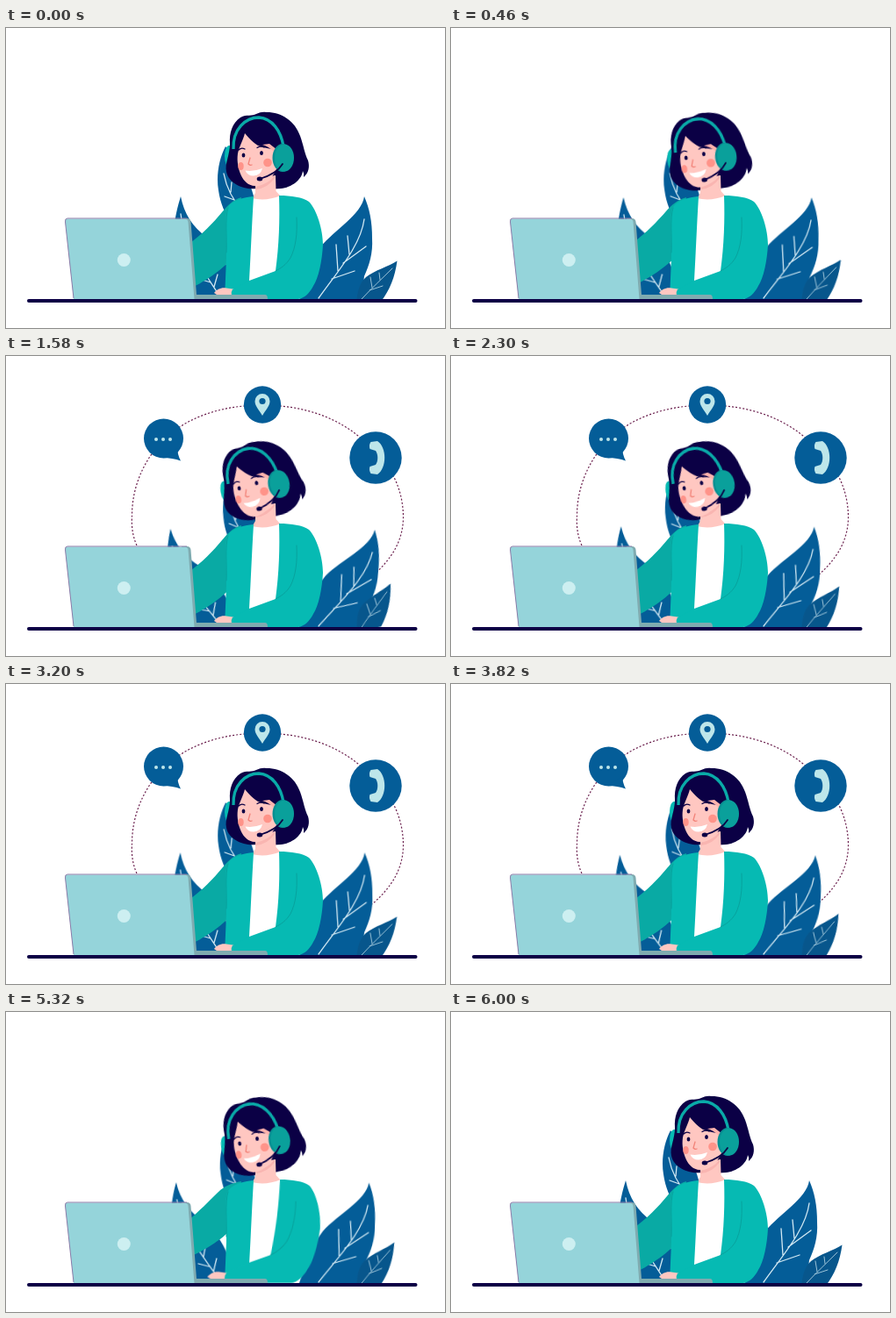
An HTML page for the animation above (6020 ms loop, 500 by 342 pixels).

```html
<!DOCTYPE html>
<html lang="en">
<head>
<meta charset="utf-8">
<title>Support agent at a laptop</title>
<style>
  html, body { margin: 0; width: 100%; height: 100%; overflow: hidden; background: #fff; }
  svg { display: block; width: 500px; height: 342px; }

  :root { --loop: 6020ms; }
  .blue { fill: #045d98; }
  .navy { fill: #0b0045; }
  .teal { fill: #06bab3; }
  .deep { fill: #09aaa4; }
  .skin { fill: #ffc7c1; }
  .pale { fill: #bde6ea; }
  .vein { fill: none; stroke: #d3e9f3; stroke-width: 1.3; stroke-linecap: round; }
  .fold { fill: none; stroke: #08a29d; stroke-width: 1; stroke-linecap: round; }

  /* Leaves: two full sways per loop */
  .leaf { animation: sway 1505ms cubic-bezier(.37, 0, .63, 1) infinite alternate; }
  @keyframes sway { from { transform: rotate(0); } to { transform: rotate(var(--turn)); } }
  .left { --turn: -6.1deg; transform-origin: 240px 305px; }
  .back { --turn: 2.8deg; transform-origin: 270px 300px; }
  .right { --turn: 6.1deg; transform-origin: 357px 308px; }
  .small { --turn: -9.5deg; transform-origin: 405px 308px; }

  .head { transform-origin: 301px 176px; animation: tilt var(--loop) ease-in-out infinite; }
  @keyframes tilt {
    0%, 51.5%, 72.3%, 100% { transform: rotate(0); }
    14.6%, 37.4%, 84.5% { transform: rotate(-10deg); }
  }

  .far-arm { animation: lift var(--loop) ease-in-out infinite; }
  @keyframes lift {
    0%, 5%, 23%, 72.5%, 100% { d: path("M268 193C258 196 252 203 246 210C236 222 224 235 207 247L207 298C224 291 246 276 258 262Z"); }
    13%, 16%, 86%, 90% { d: path("M268 193C257 195 248 199 242 205C232 215 220 227 205 240L207 280C222 274 246 260 258 246Z"); }
  }

  .near-arm { transform-origin: 340px 205px; animation: type var(--loop) ease-in-out infinite; }
  @keyframes type {
    0%, 76%, 98%, 100% { transform: skewX(0); }
    86%, 90% { transform: skewX(-4.5deg); }
  }

  .icon { animation: var(--loop) ease-out infinite; }
  .bubble { transform-origin: 180px 94px; animation-name: bubble; }
  .pin { transform-origin: 292px 55px; animation-name: pin; }
  .phone { transform-origin: 421px 116px; animation-name: phone; animation-timing-function: linear; }
  @keyframes bubble { 0%, 10.6%, 82.2%, 100% { transform: scale(0); } 13.1%, 79.4% { transform: scale(1); } }
  @keyframes pin { 0%, 12.3%, 79.7%, 100% { transform: scale(0); } 14.8%, 77.1% { transform: scale(1); } }
  @keyframes phone { 0%, 14.5%, 77.2%, 100% { transform: scale(0); } 17.9%, 74.75% { transform: scale(1); } }

  .reveal { stroke-dasharray: 1000 2000; animation: draw var(--loop) linear infinite; }
  @keyframes draw {
    0%, 10.96%, 82.4%, 100% { stroke-dashoffset: 1005; }
    20.93%, 74.75% { stroke-dashoffset: 0; }
  }
</style>
</head>
<body>
<svg viewBox="0 0 500 342" role="img" aria-label="Support agent with headset">
  <defs>
    <path id="arc" d="M149 216C143 203 143 190 143.500 182C143.500 150 156 122 175 100C203 70 245 56 292 56C340 56 380 71 408 97C438 122 452 150 452.500 183C452.500 210 440 231 417 251" pathLength="1000"/>
    <mask id="drawn" maskUnits="userSpaceOnUse" x="0" y="0" width="500" height="342">
      <use href="#arc" class="reveal" fill="none" stroke="#fff" stroke-width="6"/>
    </mask>
    <clipPath id="above"><rect width="500" height="308.500"/></clipPath>
  </defs>

  <g mask="url(#drawn)">
    <use href="#arc" fill="none" stroke="#6d2350" stroke-width="1.200" stroke-dasharray="3.700"/>
  </g>

  <g class="icon bubble">
    <circle class="blue" cx="179.500" cy="94" r="22.500"/>
    <path class="blue" d="M178 116Q190 116 199 119.500Q195 112 195.500 105Z"/>
    <g class="pale"><circle cx="171" cy="95" r="2"/><circle cx="179" cy="95" r="2"/><circle cx="187" cy="95" r="2"/></g>
  </g>
  <g class="icon pin">
    <circle class="blue" cx="292" cy="55.500" r="21.200"/>
    <path class="pale" d="M292 68C288 61 283.500 57 283.500 51.500A8.500 8.500 0 0 1 300.500 51.500C300.500 57 296 61 292 68Z"/>
    <circle class="blue" cx="292" cy="51.500" r="3.600"/>
  </g>
  <g class="icon phone">
    <circle class="blue" cx="421" cy="116" r="29.700"/>
    <path class="pale" d="M415.500 98L423 97C434 104 434 128 423 135L415.500 134Q413 130 414.500 126L421 124C424 120 424 112 421 108L414.500 106Q413 101 415.500 98Z"/>
  </g>

  <g clip-path="url(#above)">
    <g class="leaf back">
      <path class="blue" d="M250 135C243 148 239 168 242 185C244 200 250 212 254 218L286 218C285 190 275 170 265 155Z"/>
      <path class="vein" d="M248 166C251 182 259 197 270 209M256 187L257 176M260 196L249 192"/>
    </g>
    <g class="leaf left">
      <path class="blue" d="M199 192C195 205 188 230 193 250C195 280 200 300 206 312L262 312C260 285 247 255 229 239C212 226 203 212 199 192Z"/>
      <path class="vein" d="M199 212C202 245 224 276 243 305M212 251L206 232M233 290L220 286M237 295L241 281M226 279L230 262"/>
    </g>
    <g class="leaf right">
      <path class="blue" d="M408 192C405 213 375 229 358 250C345 268 340 290 333 314L404 316L408 283C414 270 418 256 417 240C417 220 414 206 408 192Z"/>
      <path class="vein" d="M356 308C378 277 404 248 408 218M378 277L376 247M391 258L389 237M384 268L410 249M371 286L397 277"/>
    </g>
    <g class="leaf small">
      <path fill="#07568c" d="M445.500 265.500C436 272 420 276 410 284C403 290 400 300 399 314L427 312C437 299 443 284 445.500 265.500Z"/>
      <path class="vein" style="stroke:#9bc3d8;stroke-width:1" d="M405 309C416 297 430 284 440 274M417 296L415 284M414 299L429 294M426 287L425 279"/>
    </g>
  </g>

  <g class="head">
    <ellipse class="teal" cx="254" cy="146" rx="5" ry="12"/>
    <path class="navy" d="M297 96C314 96 329 106 335 123C339 134 340 143 344 151C346 158 345 165 339 170Q340 166 338 163C337 173 325 182 313 183C302 184 294 184 285 183C272 185 254 178 251 164C249 154 255 145 255 132C254 119 258 108 267 102C274 98 280 101 285 98Q291 95 297 96Z"/>
  </g>

  <path class="deep far-arm" d="M268 193C258 196 252 203 246 210C236 222 224 235 207 247L207 298C224 291 246 276 258 262Z"/>

  <path class="skin" d="M284 172L307 168L307.500 186L313 192C306 202 287 202 280 195L284 188Z"/>
  <path fill="#f9b5b1" d="M284 181Q299 178 306 168V171Q298 183 284 184Z"/>

  <g clip-path="url(#above)">
    <path fill="#fff" d="M280 194Q296 198 313 191L316 270L274 292Z"/>
    <path class="teal" d="M282 192C270 193 258 196 253 204C248 212 252 238 251 262L249 309L276 309L277 288C279 254 280 224 282 192Z"/>
    <path class="fold" d="M253 205C249 217 252 240 251 256"/>
    <g class="near-arm">
      <path class="skin" d="M237 302C240 298 245 295.500 251 296.500L262 298L262 306L243 306Z"/>
      <path class="teal" d="M311 191C325 191 338 193 345 198C354 207 361 230 361 247C360 266 356 285 350 294C346 302 340 308 333 309L259 309Q255 303 258 298L277 288L307 277C311 248 312 218 311 191Z"/>
      <path class="fold" d="M331 216C332 235 330 250 324 262C319 270 313 274 307 277"/>
    </g>
  </g>

  <g class="head">
    <path class="skin" d="M271 116C265 125 262 138 263.500 151C265 166 271 179 283 180C298 179 309 166 311 150L309 132L290 116Z"/>
    <path class="navy" d="M272 120C278 127 282 131 287 134C295 137 302 138 310 139L315 125L300 108L276 106L262 115C257 127 256 140 258 151C259 163 262 171 267 176C262 162 263 152 264 143C266 134 270 128 272 120Z"/>
    <path fill="#ffb4ad" d="M292 133Q299 135 305 141L309 139L300 132Z"/>
    <g fill="#ff9389"><circle cx="298" cy="153.500" r="4.800"/><ellipse cx="267.500" cy="157.500" rx="3.200" ry="4.500"/></g>
    <g class="navy"><ellipse cx="270.500" cy="145" rx="1.900" ry="2.500"/><ellipse cx="291" cy="142.500" rx="1.900" ry="2.500"/></g>
    <path d="M265 139Q268 136 272 138M286 136.500Q290 134 294 136" fill="none" stroke="#0b0045" stroke-width="1.300" stroke-linecap="round"/>
    <path d="M278 148L276 155Q278 157 280 156" fill="none" stroke="#f28379" stroke-width="1.300" stroke-linecap="round"/>
    <path fill="#fff" d="M272.500 162.500Q282 164 292 160Q290 168 282 168.500Q275 168.500 272.500 162.500Z"/>
    <path d="M259 138C258 115 273 102 288 102C303 103 313 117 316 135" fill="none" stroke="#09aaa8" stroke-width="3.300"/>
    <ellipse fill="#078f92" cx="315" cy="148" rx="11.500" ry="16"/>
    <ellipse fill="#0aa09b" cx="317" cy="148" rx="11" ry="15.500"/>
    <path d="M315 155C309 165 299 169 289 172" fill="none" stroke="#0b0045" stroke-width="1.700" stroke-linecap="round"/>
    <ellipse class="navy" cx="289" cy="172" rx="3.300" ry="2.500"/>
  </g>

  <path fill="#7fabb0" d="M200 217L206 217Q210 217 210.500 221L217 304H295Q298 304 298 309H213Z"/>
  <path fill="#95d4da" d="M70 217.500H203Q207 217.500 207.500 221L214.500 309H77L67.500 221Q67 217.500 70 217.500Z"/>
  <path d="M77 308L67.500 221Q67 217 70 217H206" fill="none" stroke="#8a7ba8" stroke-width="1"/>
  <circle fill="#cdeff1" cx="134.300" cy="264.500" r="7.500"/>
  <rect class="navy" x="24" y="309" width="444.500" height="4" rx="2"/>
</svg>
</body>
</html>
```
